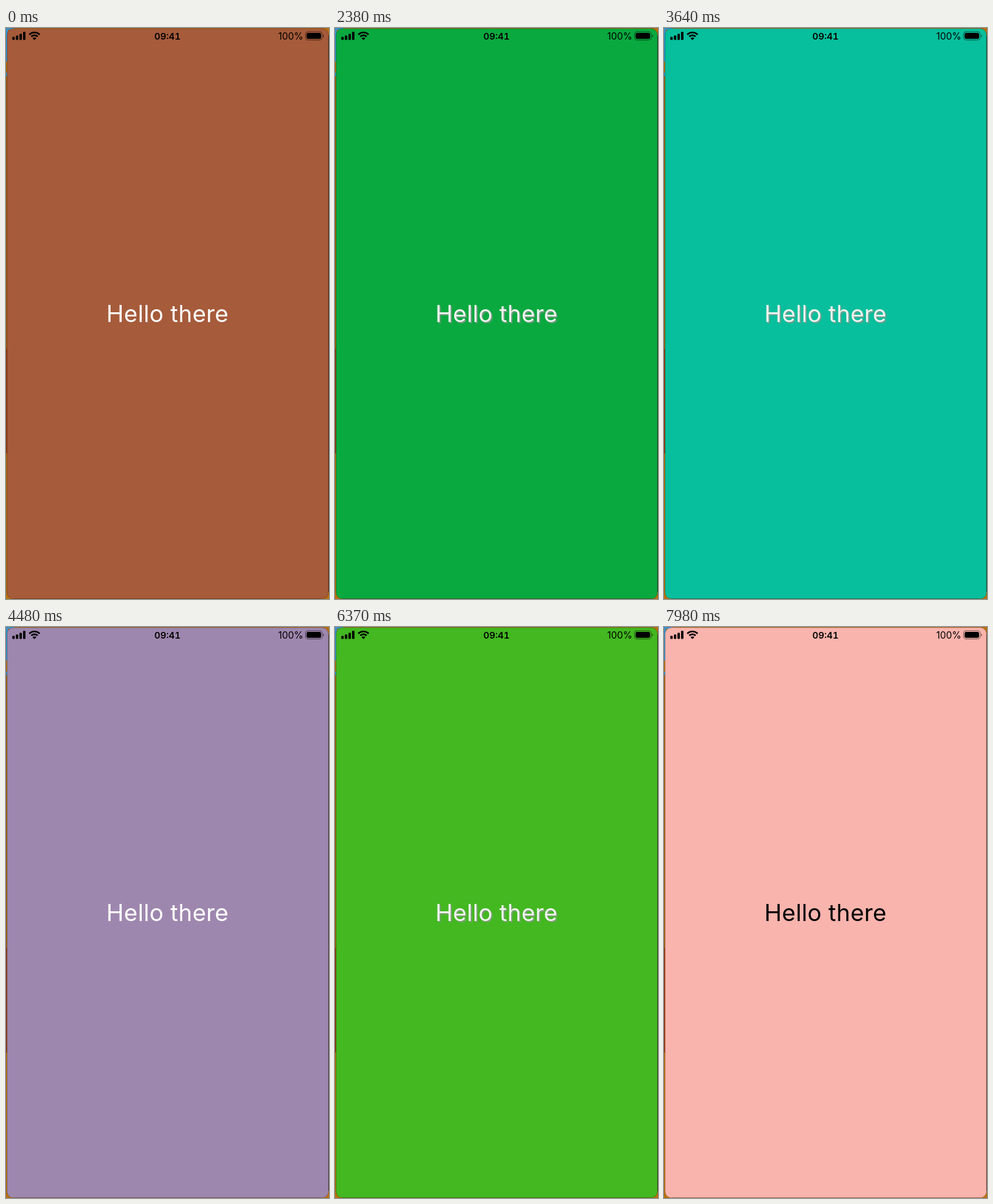
An HTML page for the animation above (8000 ms loop, 528x934 px).

```html
<!DOCTYPE html>
<html lang="en">
<head>
<meta charset="utf-8">
<title>Hello there</title>
<style>
  html, body { margin: 0; width: 100%; height: 100%; overflow: hidden; }
  svg { display: block; width: 528px; height: 934px; font-family: Inter, sans-serif; }
  .panel { animation: panel 8s step-end infinite; }
  .hello { font-size: 38.3px; letter-spacing: .3px; text-anchor: middle; }
  .face { animation: face 8s step-end infinite; }
  .shade { fill: #8f9690; animation: shade 8s step-end infinite; }
  .time { font-size: 15px; font-weight: 600; font-feature-settings: "tnum"; text-anchor: middle; }
  .charge { font-size: 15.5px; text-anchor: end; }

  @keyframes panel {
    0%      { fill: #a65b3a; }
    17.5%   { fill: #7a8a78; }
    29.75%  { fill: #09a93f; }
    37.625% { fill: #07bf9c; }
    48.125% { fill: #6f8fa0; }
    56%     { fill: #9e87ae; }
    65.625% { fill: #8a8f7a; }
    71.75%  { fill: #43b821; }
    82.25%  { fill: #8f7a6a; }
    89.25%  { fill: #8c2b52; }
    99.75%, 100% { fill: #f9b4ad; }
  }
  @keyframes face {
    0%      { fill: #fff; }
    29.75%  { fill: #eef3ee; }
    48.125% { fill: #fff; }
    71.75%  { fill: #eef3ee; }
    82.25%  { fill: #fff; }
    99.75%, 100% { fill: #000; }
  }
  @keyframes shade {
    0%      { opacity: 0; }
    29.75%  { opacity: .75; }
    48.125% { opacity: 0; }
    71.75%  { opacity: .75; }
    82.25%, 100% { opacity: 0; }
  }
</style>
</head>
<body>
<svg viewBox="0 0 528 934">
  <!-- desktop showing around the window -->
  <rect width="528" height="934" fill="#b8700f"/>
  <path d="M0 0H14V3H3V55H0zM0 73H2V79H0z" fill="#3a92c8"/>
  <path d="M0 79H2V525H0z" fill="#a0600f"/>
  <path d="M0 525H2V696H0z" fill="#96380f"/>
  <path d="M527 12H528V922H527zM12 933.5H516V934H12z" fill="#3a2a18"/>

  <rect class="panel" x="1.8" y="1" width="525.4" height="932.6" rx="10" stroke="#000" stroke-opacity=".3" stroke-width=".8"/>

  <!-- signal -->
  <rect x="10.3" y="14.6" width="3.9" height="5" rx="1"/>
  <rect x="16.2" y="12.3" width="3.9" height="7.3" rx="1"/>
  <rect x="22" y="9.6" width="3.9" height="10" rx="1"/>
  <rect x="27.9" y="6.3" width="3.9" height="13.3" rx="1"/>

  <!-- wireless -->
  <g fill="none" stroke="#000" stroke-width="2.7">
    <path d="M38 10.7A12.2 12.2 0 0 1 55 10.7"/>
    <path d="M41.3 14A7.4 7.4 0 0 1 51.7 14"/>
  </g>
  <path d="M46.5 19.8L43.4 16.7A4.4 4.4 0 0 1 49.6 16.7z"/>

  <text class="time" x="264" y="18.8">09:41</text>
  <text class="charge" x="486" y="18.8">100%</text>

  <!-- battery -->
  <rect x="489.6" y="6.2" width="27.2" height="13.4" rx="4" fill="none" stroke="#000" stroke-opacity=".45" stroke-width="1.2"/>
  <rect x="491.4" y="8" width="23.6" height="9.8" rx="2.4"/>
  <path d="M518.3 10.6Q520 11.2 520 12.9T518.3 15.2z" opacity=".5"/>

  <text class="hello shade" x="266" y="482.6">Hello there</text>
  <text class="hello face" x="264" y="480.8">Hello there</text>
</svg>
</body>
</html>
```
